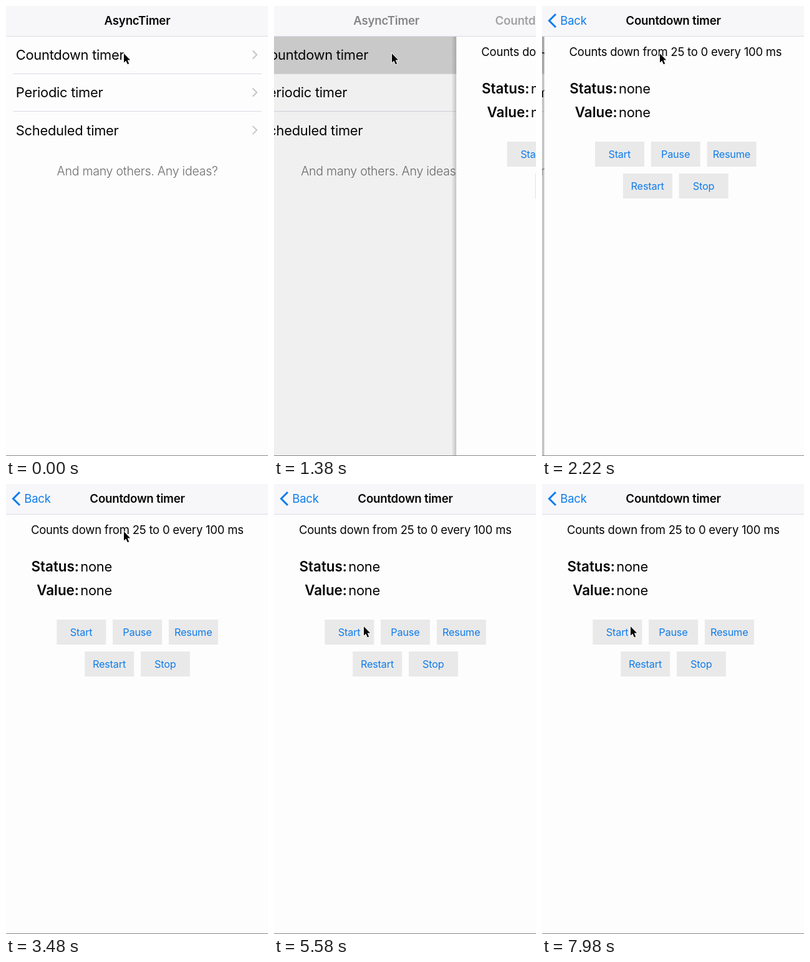
Recreate the animation shown at these times as an HTML page. Size 420x720 px, loop 8000 ms.

```html
<!DOCTYPE html>
<html lang="en">
<head>
<meta charset="utf-8">
<title>Timer navigation</title>
<style>
  html, body { margin: 0; width: 100%; height: 100%; overflow: hidden; background: #fdfdfd; }
  svg { display: block; width: 420px; height: 720px; }
  text { font-family: Inter, Roboto, sans-serif; font-size: 18.5px; letter-spacing: -.0125em; fill: #050505; white-space: pre; }
  .large { font-size: 21.9px; }
  .label { font-size: 22.4px; font-weight: 600; letter-spacing: 0; text-anchor: end; }
  .title { font-size: 18.7px; font-weight: 600; }
  .middle { text-anchor: middle; }
  .note { font-size: 19.55px; font-weight: 300; fill: #6c6c6c; }
  .button { font-size: 16.3px; }
  .blue { fill: #0f7cec; }
  .line { stroke: #d9d9e6; }
  .chevron { fill: none; stroke: #c5c5ca; stroke-width: 2; }
</style>
</head>
<body>
<svg viewBox="0 0 420 720">
  <defs>
    <linearGradient id="shade">
      <stop offset="0" stop-color="#555" stop-opacity="0"/>
      <stop offset="1" stop-color="#555" stop-opacity=".3"/>
    </linearGradient>
  </defs>

  <g id="list">
    <rect width="420" height="720" fill="#fdfdfd"/>
    <rect id="highlight" y="48" width="420" height="60.5" fill="#d4d4d4"/>
    <g id="rows"></g>
    <text class="note middle" x="210.5" y="271">And many others. Any ideas?</text>
  </g>
  <rect id="dim" width="420" height="720"/>

  <g id="detail">
    <rect x="-8" width="8" height="720" fill="url(#shade)"/>
    <rect width="420" height="720" fill="#fdfdfd"/>
    <text class="middle" x="210.3" y="80">Counts down from 25 to 0 every 100 ms</text>
    <text class="label" x="117" y="139.5">Status:</text>
    <text class="large" x="119.3" y="139.5">none</text>
    <text class="label" x="117" y="177.5">Value:</text>
    <text class="large" x="119.3" y="177.5">none</text>
    <g id="buttons"></g>
  </g>

  <rect width="420" height="48" fill="#f7f7f9"/>
  <path class="line" d="M0 48.5H420"/>
  <text id="listTitle" class="title middle" x="210.5" y="30">AsyncTimer</text>
  <text id="detailTitle" class="title middle" x="210.5" y="30">Countdown timer</text>
  <g id="back">
    <path d="M22 13L11.5 23.5L22 34" fill="none" stroke="#0f7cec" stroke-width="3"/>
    <text id="backLabel" class="blue" x="29.3" y="30">Back</text>
  </g>
  <path d="M0 719.5H420" stroke="#888"/>
  <path id="cursor" d="M0 0V14.5L3.3 11.5L5.9 17.2L8.2 16.2L5.7 10.6H10.2Z"
        fill="#050505" stroke="#fff" stroke-width="1.6" paint-order="stroke"/>
</svg>
<script>
const LOOP = 8000;
const el = id => document.getElementById(id);
const clamp = v => Math.min(1, Math.max(0, v));
const ramp = (t, from, to) => clamp((t - from) / (to - from));
const smooth = u => u * u * (3 - 2 * u);
const shift = (id, x, y = 0) => el(id).setAttribute("transform", `translate(${x} ${y})`);
const fade = (id, alpha) => el(id).setAttribute("opacity", alpha);

el("rows").innerHTML = ["Countdown", "Periodic", "Scheduled"].map((name, i) => {
  const y = 60.3 * i;
  return `<text class="large" x="15.8" y="${86 + y}">${name} timer</text>
    <path class="chevron" d="M395.5 ${71.5 + y}l6.5 6.5l-6.5 6.5"/>` +
    (i < 2 ? `<path class="line" d="M11 ${Math.floor(108 + y) + .5}H410"/>` : "");
}).join("");

const button = (name, x, y) =>
  `<rect x="${x}" y="${y}" width="79" height="40" fill="#e9e9e9"/>
   <text class="button blue middle" x="${x + 39.3}" y="${y + 26}">${name}</text>`;
el("buttons").innerHTML =
  ["Start", "Pause", "Resume"].map((name, i) => button(name, 81.3 + 89.8 * i, 217)).join("") +
  ["Restart", "Stop"].map((name, i) => button(name, 126.2 + 89.8 * i, 268)).join("");

// Remaining share of the push: a damped spring with a slow settling tail.
function remaining(t) {
  const s = Math.max(0, t - 1254) / 1000;
  const u = 8.81 * s;
  return t > 3000 ? 0 : .952 * (1 + u) * Math.exp(-u) + .048 * Math.exp(-2 * s);
}

function draw(t) {
  const left = remaining(t);
  shift("list", -126 * (1 - left));
  shift("detail", left === 1 ? 430 : 420 * left);
  fade("dim", .1 * (1 - left ** 2));
  fade("highlight", t >= 1150 ? 1 : 0);

  const nav = smooth(ramp(t, 1142, 1900));
  shift("listTitle", -129 * nav);
  fade("listTitle", .5 ** (Math.max(0, t - 1142) / 215) * (1 - ramp(t, 1750, 1950)));
  shift("detailTitle", 288 * (1 - nav));
  fade("detailTitle", ramp(t, 1260, 1610));
  shift("backLabel", 129 * (1 - nav));
  fade("back", ramp(t, 1660, 2020));

  const move = smooth(ramp(t, 4400, 5400));
  shift("cursor", 189 - 45 * move - 2 * ramp(t, 5600, 5800), 76 + 152 * move);
}

const start = performance.now();
function frame() {
  draw((performance.now() - start) % LOOP);
  requestAnimationFrame(frame);
}
frame();
</script>
</body>
</html>
```
